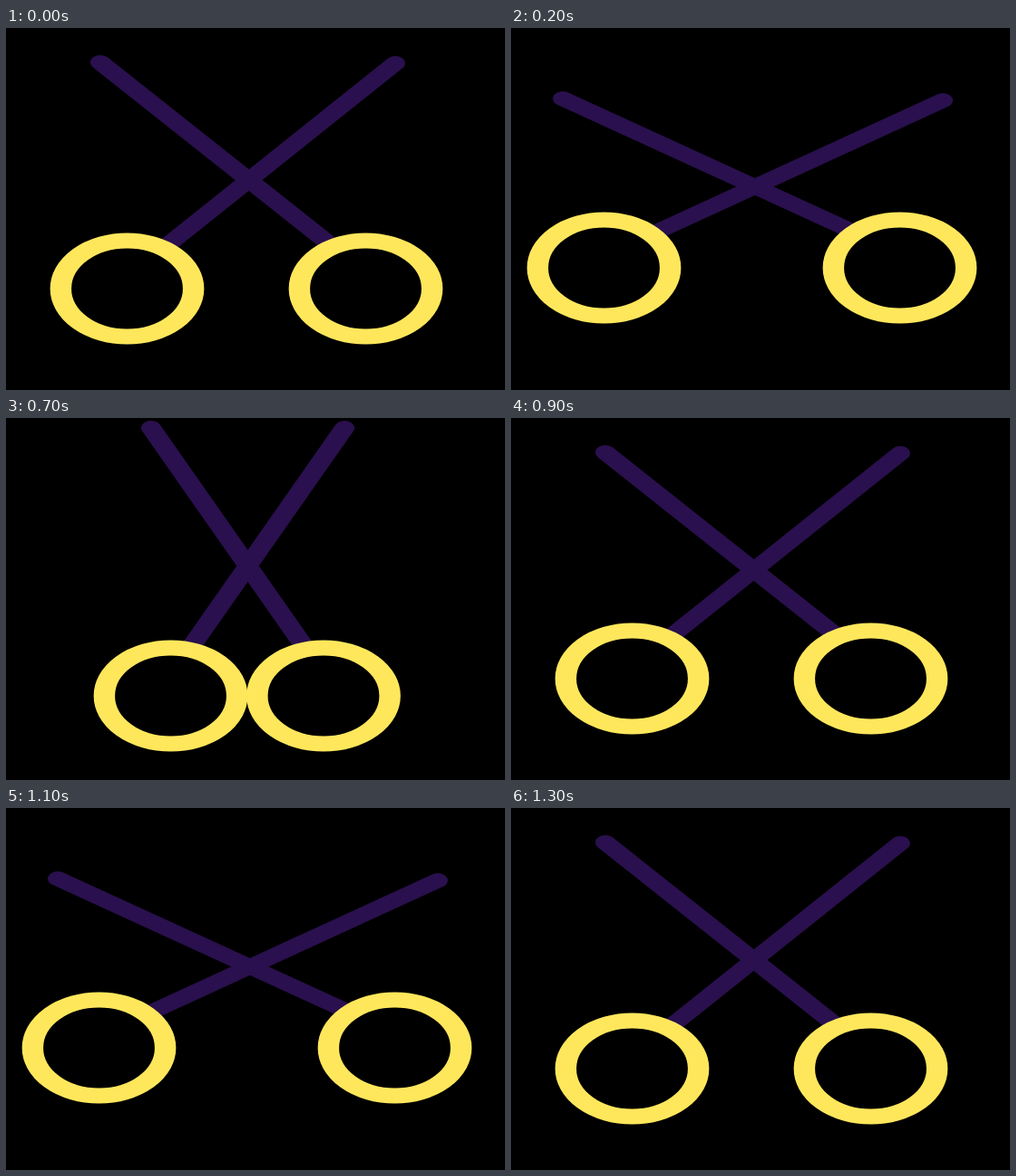
Write an HTML page with a canvas that moves like this. It is 550 px wide and 400 px high and loops after 1500 ms.

```html
<!DOCTYPE html>
<html lang="en">
<head>
<meta charset="utf-8">
<title>Scissors</title>
<style>
html, body { margin: 0; width: 100%; height: 100%; overflow: hidden; background: #000; }
canvas { display: block; }
</style>
</head>
<body>
<canvas id="stage" width="550" height="400"></canvas>
<script>
const ctx = document.getElementById('stage').getContext('2d');
const STRETCH = 1.38; // the whole drawing is widened horizontally
const LOOP = 1500;

// Each blade: tip and inner end; each ring: centre
const half = {
  blades: [[104, 38, 357, 239], [429, 39, 179, 239]],
  rings: [[133.5, 288], [396.5, 288]]
};
const open = {
  blades: [[57, 78, 377, 225], [476, 80, 161, 225]],
  rings: [[102.5, 265], [428.5, 265]]
};
const closed = {
  blades: [[160, 11, 327, 250], [373, 11, 206, 250]],
  rings: [[181.5, 307], [350, 307]]
};

// Start time of each held pose
const steps = [[0, half], [200, open], [500, half], [700, closed],
               [900, half], [1100, open], [1300, half]];

function drawBlade([x1, y1, x2, y2]) {
  ctx.beginPath();
  ctx.moveTo(x1 / STRETCH, y1);
  ctx.lineTo(x2 / STRETCH, y2);
  ctx.lineWidth = 16;
  ctx.strokeStyle = '#2a104e';
  ctx.stroke();
}

function drawRing([x, y]) {
  ctx.beginPath();
  ctx.arc(x / STRETCH, y, 53, 0, Math.PI * 2);
  ctx.lineWidth = 17;
  ctx.fillStyle = '#000';
  ctx.fill();
  ctx.strokeStyle = '#ffe75c';
  ctx.stroke();
}

function frame() {
  const t = performance.now() % LOOP;
  const pose = steps.filter(([start]) => start <= t).pop()[1];
  ctx.setTransform(1, 0, 0, 1, 0, 0);
  ctx.fillStyle = '#000';
  ctx.fillRect(0, 0, 550, 400);
  ctx.scale(STRETCH, 1);
  ctx.lineCap = 'round';
  pose.blades.forEach(drawBlade);
  pose.rings.forEach(drawRing);
  requestAnimationFrame(frame);
}
frame();
</script>
</body>
</html>
```
